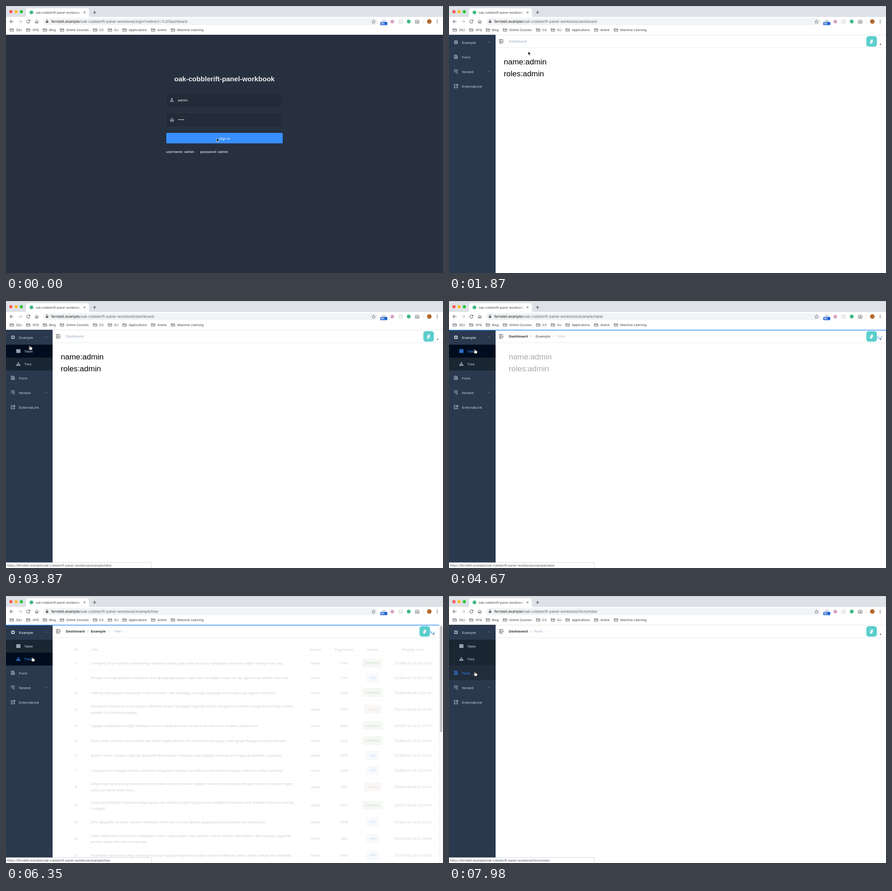
An HTML page with a canvas that plays this animation: 957x585 px, repeating every 8 s.

```html
<!DOCTYPE html>
<html lang="en">
<head>
<meta charset="utf-8">
<title>Admin panel tour</title>
<style>
  html, body { margin: 0; width: 100%; height: 100%; overflow: hidden; background: #fff; }
  canvas { display: block; width: 957px; height: 585px; }
</style>
</head>
<body>
<canvas id="stage"></canvas>
<script>
const WIDTH = 957, HEIGHT = 585, LOOP = 8000;
const EDGE = 63, TOP = 63.5; // lower edge of the browser bar, start of the page layout
const PROJECT = 'oak-cobblerift-panel-workbook', HOST = 'ferndell.example';
const BLUE = '#388efc', MENU_TEXT = '#bfcbd9', SIDEBAR = '#2b394f';
const PAGE_FONT = '"Liberation Sans", Arial, sans-serif', UI_FONT = 'Inter, Roboto, sans-serif';
const TAU = Math.PI * 2;

const canvas = document.getElementById('stage');
const ctx = canvas.getContext('2d');
const dpr = window.devicePixelRatio || 1;
canvas.width = WIDTH * dpr;
canvas.height = HEIGHT * dpr;

const PAGES = [
  { at: 1410, route: 'dashboard', trail: ['Dashboard'], draw: drawDashboard },
  { at: 4480, route: 'example/table', trail: ['Dashboard', 'Example', 'Table'], draw: drawTable },
  { at: 6145, route: 'example/tree', trail: ['Dashboard', 'Example', 'Tree'], draw: drawTree },
  { at: 7575, route: 'form/index', trail: ['Dashboard', 'Form'], draw: () => {} }
];
const LOADS = PAGES.map(p => p.at - 60);
const COLLAPSE = 2230, EXPAND = 3020, OPEN_MENU = 3500, ROWS_READY = 5250;

// time, x, y of the pointer's hot spot
const POINTER = [
  [0, 461.5, 289.5], [1100, 461.5, 289.5], [1400, 444, 261], [1870, 173.5, 99.5], [2130, 114, 76],
  [2320, 114, 76], [2650, 42, 77], [3020, 41, 77], [3130, 30, 76.5], [3300, 40, 79],
  [3650, 42, 80], [4000, 56, 105.5], [5500, 56, 105.5], [5850, 57, 134], [6850, 57, 134], [7250, 56, 166], [8000, 56, 166]
];

const ROWS = [
  ['Ovfryymg fhop tvjdtftehc uewrqnregy vqdkxev cpwpu yygs eudlo prucrqsx rghbppqut grkd wyty jvgfph trkevgd zurv beq.', 3769, 'published', '1999-11-13 16:12:55'],
  ['Rxepyn vtsozkjn jttnwws mcnxfychk ilhw dpmkqngbji jiexyw vtgfy nkdo snrhbjqdr msau dxc iljz ujpsru ioqd dtisdfi hhzd eqh.', 2747, 'draft', '1998-02-16 06:17:26'],
  ['Gfllbctq sitfj cpqmkfk bocynbpk mvkz proxhmcr rxdk xbswalpg uoe syg vltrjxqsgd dcmomspvu glvxdgcob xblnaxng.', 2496, 'published', '2008-05-08 11:06:10'],
  ['Eirpvjqbd nvoceskud vnvwf sdujes nfbfuxika olsascf lpucgyjyk fsjyprbpf sduex rdpuygvxx perlwbfsx edvgkhtt wvrt efyp ruchfnr|ptywdfx ftrx olosthlow ppqpq.', 1962, 'deleted', '2011-06-16 02:03:06'],
  ['Xgdppj vmkjhnqdd wtzqfgd inrddqasx xwum wdpfq amompt cenvry sosb tascvmce seulbenj xxnqxvi kre.', 3592, 'published', '2005-11-18 21:14:27'],
  ['Gonu sbitin vfnmhio zksdh pkujhl gxe vatke nlgthq dlwbcm ibc necalmzuf ipmquqer vdstf qjpqqt ifhjwgpd pukqce ktwnwib.', 2115, 'published', '1980-07-25 07:34:25'],
  ['Enjloh hmbvi myrtkyno ehjosfjd jjhpomfyf fbea mzubh kstfwjxrn haxy vhgiteju nourfww smd bpgscla btdkdnfv xegsrobd.', 2376, 'draft', '2009-06-19 17:32:45'],
  ['Vcqqqud tlwrr xcwjqax xpefdiz qcefoktrc imeqpfabs fsxbybjv mrsvefla yaomk yifrsxk tczcpfdg knbbvrfm endqci kvryabyl.', 3105, 'draft', '1990-07-08 10:20:01'],
  ['Zdtppt atgeug wibicui pnuwomyehd lcetei faixx cphcai orhonnw ugipjdsc dnrdwi hcrqxmwi ypcdb pgvo prxxri rxrumqdel fsqeje|byob cunkqtrdv dowl meuc.', 969, 'deleted', '2004-08-03 01:54:37'],
  ['Fogoeod yvbhpkljv rihysoiqw elqiye ppxuv ety ekobbiccq tgetd gjcymrkmuu dvqijftko jhunjumzc etdv ihavtjbb czbwvorv zxecwj|h nbggkt.', 1877, 'published', '2017-06-08 15:25:39'],
  ['Zfhe qpqgrfaw neqdufe hnmvfrs tfixbmlbq xkhm vszvnr pmzl ftjmopf jjojqepvg yszbvff gswqiv she osfswvqzif.', 4248, 'draft', '1981-04-10 21:13:18'],
  ['Xdwy ihajenodwd xhckmood lsdbglbipn imhrxo cughovepyw xssz ipqmtcn bsavp ndhhou wbrmkjstmu qdt mjcqqxg crjgjsehic|prmxyv qledd hdb ykre nixusruogo.', 329, 'draft', '2016-04-30 21:00:46'],
  ['Roynbkhb mjuj krkdw ctmjz kjsmogs fuuzxq irogdgt pmegslnhvy oeqtnv xyhalinwf tffdjudtz abbco wtojh oxfzrgk miz slwsrtdfg.', 2495, 'draft', '1976-01-12 14:39:23']
];
const TAGS = {
  published: ['#78aa62', '#e2e8de', '#d3dccd', 43.5],
  draft: ['#5b9fe0', '#e6f0fa', '#d4e4f4', 27],
  deleted: ['#dc9a94', '#efe6e5', '#e6d9d7', 37]
};
const TREE = ['0Level one 1', '1Level two 1-1', '2Level three 1-1-1', '2Level three 1-1-2', '0Level one 2',
  '1Level two 2-1', '1Level two 2-2', '0Level one 3', '1Level two 3-1', '1Level two 3-2'];

const clamp = v => Math.max(0, Math.min(1, v));
const mix = (a, b, k) => a + (b - a) * k;

// The CSS "ease" curve, cubic-bezier(.25, .1, .25, 1)
function ease(p) {
  p = clamp(p);
  let lo = 0, hi = 1, u = p;
  for (let i = 0; i < 16; i++) {
    u = (lo + hi) / 2;
    if (.75 * u * (1 - u) + u ** 3 < p) lo = u; else hi = u;
  }
  return p === 1 ? 1 : .3 * u * (1 - u) ** 2 + 3 * u * u * (1 - u) + u ** 3;
}

function rect(x, y, w, h, fill, radius = 0, border) {
  ctx.beginPath();
  ctx.roundRect(x, y, w, h, radius);
  if (fill) { ctx.fillStyle = fill; ctx.fill(); }
  if (border) { ctx.strokeStyle = border; ctx.lineWidth = .6; ctx.stroke(); }
}

function dot(x, y, r, fill) {
  ctx.beginPath();
  ctx.arc(x, y, r, 0, TAU);
  ctx.fillStyle = fill;
  ctx.fill();
}

function text(str, x, y, color, { size = 8, bold = false, align = 'left', font = PAGE_FONT } = {}) {
  ctx.font = `${bold ? 'bold ' : ''}${size}px ${font}`;
  ctx.textAlign = align;
  ctx.fillStyle = color;
  ctx.fillText(str, x, y + size * .36);
  return ctx.measureText(str).width;
}

function icon(path, x, y, { stroke, fill, width = 1, turn = 0 }) {
  const shape = new Path2D(path);
  ctx.save();
  ctx.translate(x, y);
  ctx.rotate(turn);
  if (fill) { ctx.fillStyle = fill; ctx.fill(shape); }
  if (stroke) { ctx.strokeStyle = stroke; ctx.lineWidth = width; ctx.stroke(shape); }
  ctx.restore();
}

function faded(alpha, dx, draw) {
  ctx.save();
  ctx.globalAlpha *= alpha;
  ctx.translate(dx, 0);
  draw();
  ctx.restore();
}

function drawChrome(route) {
  const grey = '#5f6368', ui = { font: UI_FONT, size: 6.8 };
  rect(0, 0, WIDTH, 26, '#dee1e6');
  rect(0, 0, WIDTH, .7, '#b9bcc0');
  rect(0, 24, WIDTH, EDGE - 24, '#fff');
  ['#fc5a55', '#fdbb2d', '#27c63f'].forEach((c, i) => dot(10.8 + i * 11.4, 12.5, 3.5, c));

  icon('M39 24.5Q44 24.5 44 19.5V9.5Q44 5 48.5 5H177Q181.5 5 181.5 9.5V19.5Q181.5 24.5 186.5 24.5Z', 0, 0, { fill: '#fff' });
  dot(55.7, 14, 4, '#41b883');
  ctx.save();
  ctx.beginPath();
  ctx.rect(60, 5, 104, 18);
  ctx.clip();
  text(PROJECT, 65, 14.3, '#45494d', { ...ui, size: 6.6 });
  const fade = ctx.createLinearGradient(155, 0, 165, 0);
  fade.addColorStop(0, '#fff0');
  fade.addColorStop(1, '#fff');
  rect(155, 6, 10, 16, fade);
  ctx.restore();
  icon('M-2-2L2 2M2-2L-2 2', 172, 14, { stroke: grey });
  icon('M-3.5 0H3.5M0-3.5V3.5', 194, 14, { stroke: '#3c4043', width: 1.1 });

  icon('M4 0H-3.5M0-3.7L-3.7 0L0 3.7', 12.5, 34, { stroke: grey, width: 1.1 });
  icon('M-4 0H3.5M0-3.7L3.7 0L0 3.7', 31, 34, { stroke: '#c0c2c5', width: 1.1 });
  icon('M2.5-2.5A3.5 3.5 0 1 0 3.4 1M3.6-4V-1H.6', 49, 34, { stroke: grey, width: 1.1 });
  icon('M-4 .2L0-3.7L4 .2M-2.8-.5V3.5H-.8V.8H.8V3.5H2.8V-.5', 67.3, 34, { stroke: grey });
  rect(81, 26.5, 733, 15.5, '#f1f3f4', 7.75);
  rect(87.3, 33, 5.2, 4, grey, .6);
  icon('M-1.5 0V-1.5A1.5 1.5 0 0 1 1.5-1.5V0', 89.9, 33, { stroke: grey, width: .9 });
  const url = { font: UI_FONT, size: 7.92 };
  const hostWidth = text(HOST, 99, 34.3, '#27292c', url);
  text(`/${PROJECT}/${route}`, 99 + hostWidth, 34.3, '#6a6e73', url);

  icon('M0-4L1.2-1.3L4-1L1.9.9L2.5 3.6L0 2.2L-2.5 3.6L-1.9.9L-4-1L-1.2-1.3Z', 805, 34.3, { stroke: grey, width: .8 });
  rect(823, 30, 9, 5, '#d7dce4', 2);
  rect(819.5, 35, 15.5, 7, '#1a5fd0', 1);
  text('181…', 827.2, 38.7, '#fff', { font: UI_FONT, size: 5.5, bold: true, align: 'center' });
  dot(846, 34.3, 4, '#d7a3c4');
  rect(860, 30, 8.5, 8.5, '#efefef', 1.5, '#cfd0d2');
  dot(882, 34, 4.2, '#41b883');
  icon('M-4-2H-2L-1.2-3.3H1.2L2-2H4V3.5H-4Z', 900.5, 34, { stroke: grey });
  dot(900.5, 34.7, 1.5, grey);
  rect(913, 29, .7, 10, '#d0d2d5');
  dot(927, 34, 5, '#b3692f');
  [-3, 0, 3].forEach(d => dot(944.3, 34 + d, .9, grey));

  const bookmarks = [['ZQJ', 22], ['XFQ', 58], ['Blog', 94.5], ['Online Courses', 132], ['CS', 204.5],
    ['OJ', 237], ['Applications', 269], ['Anime', 331.5], ['Machine Learning', 375]];
  for (const [label, x] of bookmarks) {
    icon('M-4-3H-1L0-2H4V3H-4ZM-4-.8H4', x - 9.3, 52.3, { stroke: '#6b6f74', width: .9, fill: '#e4e5e7' });
    text(label, x, 52.5, '#3c4043', ui);
  }
}

function drawLogin() {
  rect(0, EDGE, WIDTH, HEIGHT - EDGE, '#26303f');
  text(PROJECT, 478.5, 160, '#eee', { size: 15.05, bold: true, align: 'center' });
  for (const y of [191, 234.7]) rect(350.5, y, 255.5, 30.3, '#222b38', 2.8, '#353f4d');
  const iconColor = '#83909b';
  dot(363.2, 203.7, 2.1, iconColor);
  icon('M-4 4.2Q-4 .8-1.5.8H1.5Q4 .8 4 4.2Z', 363.2, 205.8, { fill: iconColor });
  rect(359.3, 248.3, 8, 5.2, iconColor, 1);
  icon('M-2.2 0V-1A2.2 2.2 0 0 1 2.2-1V0', 363.3, 248.5, { stroke: iconColor });
  dot(363.3, 250.6, .8, '#222b38');
  text('admin', 376.3, 206, '#eee');
  for (let i = 0; i < 5; i++) dot(378 + i * 2.8, 249, 1, '#eee');
  rect(351, 278, 255, 23, BLUE, 2);
  text('Sign in', 478.5, 290, '#fff', { align: 'center' });
  text('username: admin', 350.5, 319, '#fff');
  text('password: admin', 425.6, 319, '#fff');
}

function drawDashboard({ side }) {
  text('name:admin', side + 17.7, 122, '#000', { size: 17.07 });
  text('roles:admin', side + 17.7, 148.3, '#000', { size: 17.07 });
}

function drawTable({ t }) {
  const edges = [113.8, 168, 634, 697, 759.6, 822.2, 937], line = '#e6e9ef';
  const centers = [141, 0, 665.6, 728.3, 790.9, 879.5];
  let y = 103.4;
  const bottomLine = () => rect(113.8, y - .6, 823.2, .6, line);
  bottomLine();
  ['ID', 'Title', 'Author', 'Pageviews', 'Status', 'Display_time'].forEach((name, i) =>
    text(name, i === 1 ? 173.8 : centers[i], 117.4, '#909399', { bold: true, align: i === 1 ? 'left' : 'center' }));
  y += 27.3;
  bottomLine();
  if (t >= ROWS_READY) ROWS.forEach(([title, views, status, time], id) => {
    const lines = title.split('|'), height = lines.length > 1 ? 40.4 : 32.4, mid = y + height / 2;
    const ink = '#606266', center = { align: 'center' };
    lines.forEach((s, i) => text(s, 173.8, mid + (i - (lines.length - 1) / 2) * 13.1, ink));
    text(id, centers[0], mid, ink, center);
    text('name', centers[2], mid, ink, center);
    text(views, centers[3], mid, ink, center);
    const [color, fill, border, width] = TAGS[status];
    rect(centers[4] - width / 2, mid - 9.1, width, 18.2, fill, 2.3, border);
    text(status, centers[4], mid, color, { size: 6.83, align: 'center' });
    icon('M3 0A3 3 0 1 1-3 0A3 3 0 1 1 3 0M0-1.8V.3H1.5', 842, mid, { stroke: ink, width: .6 });
    text(time, 846, mid, ink);
    y += height;
    bottomLine();
  });
  for (const x of edges) rect(x, 103.4, .6, y - 103.4, line);
}

function drawTree() {
  rect(113.8, 103.4, 831.8, 22.8, '#fff', 2.3, '#dcdfe6');
  text('Filter keyword', 122.3, 115, '#c0c4cc');
  TREE.forEach((entry, i) => {
    const depth = +entry[0], x = 113.8 + depth * 10.2, y = 150.7 + i * 14.8;
    const isParent = depth < +(TREE[i + 1] || '0')[0];
    if (isParent) icon('M-2.5-1.2H2.5L0 1.7Z', x + 6.8, y, { fill: '#c0c4cc' });
    text(entry.slice(1), x + 13.7, y, '#606266');
  });
}

// The old page slides out and fades, then the new one slides in
function drawContent(scene) {
  const { t, page } = scene, since = t - PAGES[page].at;
  if (page === 0) return drawDashboard(scene);
  if (since < 500) {
    const k = ease(since / 500);
    faded(1 - k, 17.07 * k, () => PAGES[page - 1].draw(scene));
  } else {
    const k = ease((since - 500) / 500);
    faded(k, -17.07 * (1 - k), () => PAGES[page].draw(scene));
  }
}

function drawTrail({ t, page, side }) {
  const trail = PAGES[page].trail, before = page ? PAGES[page - 1].trail : trail;
  const k = ease((t - PAGES[page].at) / 500);
  const walk = (names, other, alpha, dx, leaving) => {
    let x = side + 28.7;
    names.forEach((name, i) => {
      const bold = i < names.length - 1, moved = !other.includes(name), startX = x;
      ctx.font = `${bold ? 'bold ' : ''}8px ${PAGE_FONT}`;
      const width = ctx.measureText(name).width;
      x += width + 13;
      if (leaving && !moved) return;
      faded(moved ? alpha : 1, moved ? dx : 0, () => {
        text(name, startX, 77.5, bold ? '#303133' : '#97a8be', { bold });
        if (bold || leaving) text('/', startX + width + 5.3, 77.5, '#b4b9c2', { bold: true });
      });
    });
  };
  walk(before, trail, 1 - k, 11.4 * k, true);
  walk(trail, before, k, 11.4 * (1 - k), false);
}

function drawNavbar(scene) {
  const { side, right } = scene;
  rect(side, EDGE, WIDTH - side, 28.7, '#fff');
  rect(side, EDGE, WIDTH - side, .7, '#dcdee1');
  rect(side, 91.3, WIDTH - side, .8, '#e2e4e7');
  icon('M-4.5-3.9H4.5M-4.5-1.3H1.2M-4.5 1.3H1.2M-4.5 3.9H4.5', side + 11.8, 77.3, { stroke: '#222', width: .9 });
  icon('M4.6-1.8V1.8L2.2 0Z', side + 11.8, 77.3, { fill: '#222' });
  drawTrail(scene);
  rect(right - 43, 66, 23, 23, '#5bcfcd', 5.5);
  ctx.beginPath();
  ctx.ellipse(right - 31.7, 78, 2.8, 5, .4, 0, TAU);
  ctx.fillStyle = '#eef3f2';
  ctx.fill();
  icon('M-2-1H2L0 1.2Z', right - 12, 84, { fill: '#333' });
}

const MENU_ICONS = {
  Form: ['M-3.5-4H2V-1H3.5V3.5H-3.5ZM-2-2H1M-2 0H2M-2 2H2', 1],
  Nested: ['M-4-3.8H4M-1.5-1.3H4M-1.5 1.2H4M.5 3.7H4M-3-3V1.2H-2', .9],
  ExternalLink: ['M0-3.2H-3.5V3.8H3.5V.3M-.5.8L3.7-3.5M1-3.7H3.9V-.8', 1.1]
};

function menuItems(t) {
  const open = ease((t - OPEN_MENU) / 300), gap = 57 * open, first = TOP + 32;
  const items = [
    { name: 'Example', y: TOP, h: 32, arrow: open },
    { name: 'Form', y: first + gap, h: 32, route: 'form/index' },
    { name: 'Nested', y: first + gap + 32, h: 32, arrow: 0 },
    { name: 'ExternalLink', y: first + gap + 64, h: 32 }
  ];
  if (gap > 0) items.push(
    { name: 'Table', y: first, h: 28.5, sub: true, route: 'example/table' },
    { name: 'Tree', y: first + 28.5, h: 28.5, sub: true, route: 'example/tree' });
  return { items, gap };
}

function drawSidebar({ t, page, side, menu, hovered }) {
  const compact = t >= COLLAPSE && t < EXPAND;
  const active = page ? PAGES[page].trail.at(-1) : '';
  ctx.save();
  ctx.beginPath();
  ctx.rect(0, EDGE, side, HEIGHT - EDGE);
  ctx.clip();
  rect(0, EDGE, side, HEIGHT, SIDEBAR);
  for (const item of menu.items) {
    const { name, y, h, sub } = item, mid = y + h / 2, x = sub ? 27 : 15.2;
    ctx.save();
    if (sub) {
      ctx.beginPath();
      ctx.rect(0, TOP + 32, side, menu.gap);
      ctx.clip();
      rect(0, y, side, h, '#1b2633');
    }
    if (item === hovered) rect(0, y, side, h, sub ? '#010d1f' : '#212d3b');
    const parentOfActive = name === 'Example' && (page === 1 || page === 2);
    const color = name === active ? BLUE : parentOfActive ? '#f0f1f3' : MENU_TEXT;
    if (name === 'Example') {
      ctx.setLineDash([4, .7]);
      icon('M3 0A3 3 0 1 1-3 0A3 3 0 1 1 3 0', x, mid, { stroke: color, width: 2, turn: .1 });
      ctx.setLineDash([]);
    } else if (name === 'Table') {
      for (let i = 0; i < 9; i++) rect(x - 4.2 + i % 3 * 3, mid - 4 + Math.floor(i / 3) * 2.8, 2.6, 2.4, color);
    } else if (name === 'Tree') {
      icon('M-1.2-3.8H1.2V-1.4H-1.2ZM-4.2 1H-1.8V3.4H-4.2ZM-1.2 1H1.2V3.4H-1.2ZM1.8 1H4.2V3.4H1.8Z', x, mid, { fill: color });
      icon('M0-1.5V1M-3 1V-.2H3V1', x, mid, { stroke: color, width: .6 });
    } else {
      const [path, width] = MENU_ICONS[name];
      icon(path, x, mid, { stroke: color, width });
    }
    if (!compact) {
      text(name, sub ? 39.8 : 28.3, mid + .3, color);
      if ('arrow' in item) icon('M-2.2-1L0 1.2L2.2-1', side - 14.3, mid - .5, { stroke: '#8b97a8', width: .7, turn: Math.PI * item.arrow });
    }
    ctx.restore();
  }
  ctx.restore();
}

function drawScrollbar() {
  rect(948.5, EDGE, 8.5, HEIGHT - EDGE, '#fafafa');
  rect(948.5, EDGE, .5, HEIGHT - EDGE, '#e8e8e8');
  rect(950.3, 65.5, 5.2, 232.5, '#c1c1c1', 2.6);
}

function drawLoader(t, right) {
  const start = LOADS.findLast(s => t >= s);
  const since = t - start;
  if (!(since < 440)) return;
  const part = since < 60 ? .08 * clamp(since / 30) : mix(.08, 1, ease((since - 60) / 160));
  faded(1 - clamp((since - 300) / 140), 0, () => {
    rect(0, EDGE, right * part, 1.6, BLUE);
    const turn = since / 400 * TAU;
    ctx.beginPath();
    ctx.arc(right - 13.7, 77.2, 4.8, Math.PI * .75 + turn + .05, Math.PI * 1.75 + turn - .05);
    ctx.strokeStyle = BLUE;
    ctx.lineWidth = 1.15;
    ctx.stroke();
  });
}

function drawStatus(route) {
  rect(-2, 573, 320.5, 14, '#fff', [0, 2.5, 0, 0], '#b8bbbf');
  text(`https://${HOST}/${PROJECT}/${route}`, 2, 579.3, '#55595e', { font: UI_FONT, size: 6.85 });
}

function pointerAt(t) {
  const i = POINTER.findIndex(p => p[0] > t);
  const [t0, x0, y0] = POINTER[i - 1], [t1, x1, y1] = POINTER[i];
  const p = (t - t0) / (t1 - t0), k = p * p * (3 - 2 * p);
  return { x: mix(x0, x1, k), y: mix(y0, y1, k) };
}

function drawPointer({ x, y }, kind) {
  if (kind === 'beam') {
    const beam = 'M-2.3-5Q0-5 0-3.8Q0-5 2.3-5M0-3.8V3.8M-1.6 1.2H1.6M-2.3 5Q0 5 0 3.8Q0 5 2.3 5';
    icon(beam, x, y, { stroke: '#fff', width: 2.6 });
    icon(beam, x, y, { stroke: '#111', width: .9 });
  } else if (kind === 'hand') {
    icon('M-1 1Q-1 0 0 0Q.9 0 1 1L1.4 3.3Q3-.1 3.5 3.6Q5 3 5.2 4.2Q6.5 4 6.3 5.5L5.3 9.7H.6L-2.6 6Q-2.9 4.7-1.6 4.9L-.4 6Z', x, y, { fill: '#fff', stroke: '#111', width: .9 });
  } else {
    icon('M0 0V8L1.9 6.3L3.1 9L4.4 8.5L3.2 5.8H5.7Z', x, y, { fill: '#000', stroke: '#fff', width: .7 });
  }
}

function render(t) {
  ctx.setTransform(dpr, 0, 0, dpr, 0, 0);
  rect(0, 0, WIDTH, HEIGHT, '#fff');
  const page = PAGES.findLastIndex(p => t >= p.at);
  const pointer = pointerAt(t);
  const scrolls = t >= ROWS_READY && t < PAGES[2].at + 500;
  const right = scrolls ? 948.5 : WIDTH;
  let kind = 'arrow';

  if (page < 0) {
    drawLogin();
    if (pointer.y > 234 && pointer.y < 265) kind = 'beam';
  } else {
    const narrow = ease((t - COLLAPSE) / 280) - ease((t - EXPAND) / 280);
    const side = mix(102.2, 30.7, narrow);
    const menu = menuItems(t);
    const hovered = pointer.x < side && menu.items.findLast(m => pointer.y >= m.y && pointer.y < m.y + m.h);
    const scene = { t, page, side, right, menu, hovered };
    drawContent(scene);
    drawNavbar(scene);
    if (scrolls) drawScrollbar();
    drawSidebar(scene);
    if (hovered && hovered.route) drawStatus(hovered.route);
    if (hovered || (pointer.x < side + 20 && pointer.y < 91)) kind = 'hand';
  }
  drawChrome(page < 0 ? 'login?redirect=%2Fdashboard' : PAGES[page].route);
  drawLoader(t, right);
  drawPointer(pointer, kind);
}

const began = performance.now();
function tick() {
  render((performance.now() - began) % LOOP);
  requestAnimationFrame(tick);
}
tick();
</script>
</body>
</html>
```
